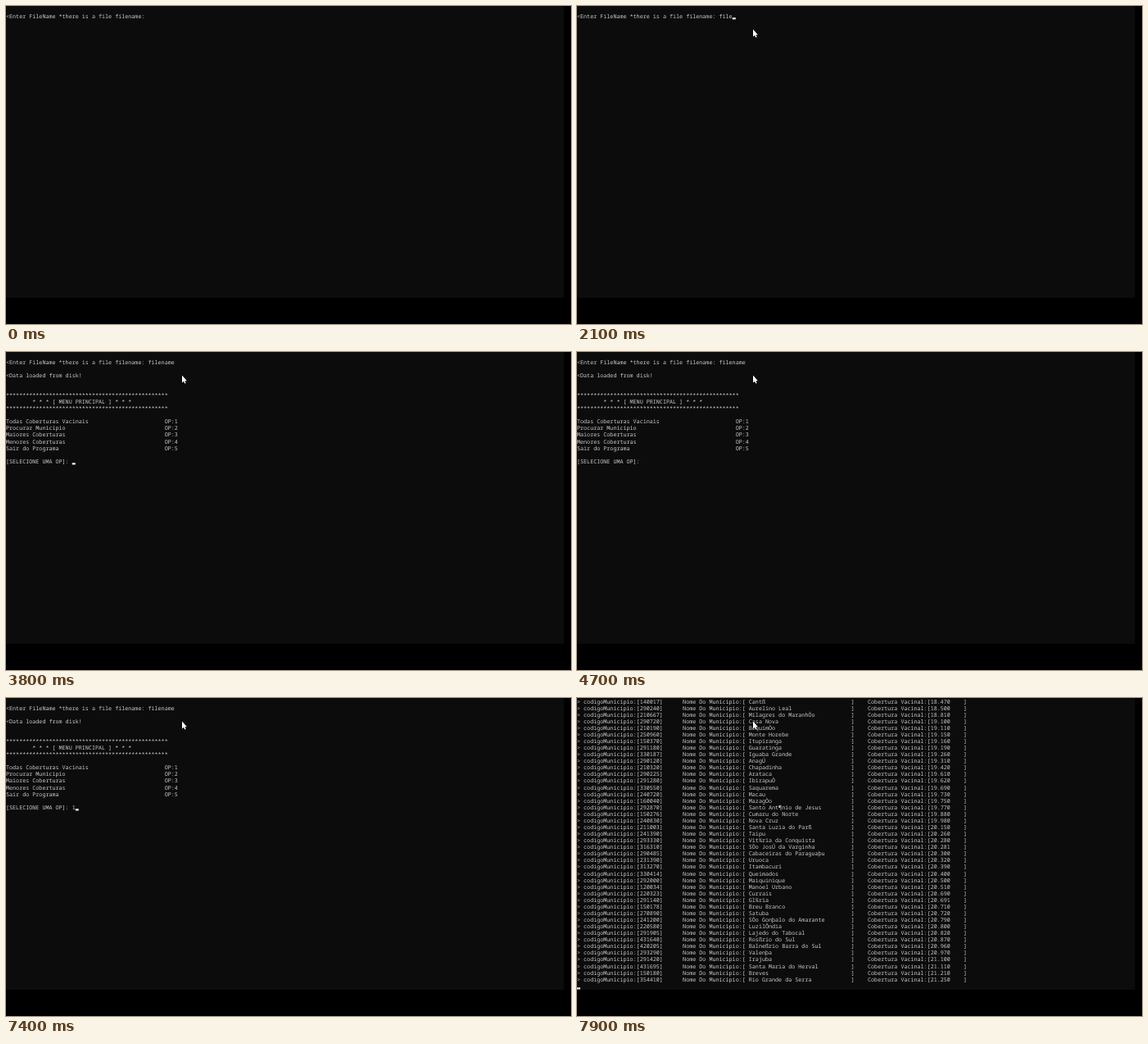
An HTML page with a canvas that plays this animation: 690x388 px, repeating every 8000 ms.

```html
<!DOCTYPE html>
<html lang="pt">
<head>
<meta charset="utf-8">
<title>Console</title>
<style>
  html, body { margin: 0; width: 100%; height: 100%; overflow: hidden; background: #000; }
  canvas { display: block; }
</style>
</head>
<body>
<canvas id="stage" width="690" height="388"></canvas>
<script>
const LOOP = 8000;
const COL = 10, ROW = 20, SCALE = 0.4037; // character cell in console units
const ctx = document.getElementById('stage').getContext('2d');

const prompt = '\n<Enter FileName *there is a file filename: ';
const stars = '*'.repeat(49);
const options = ['Todas Coberturas Vacinais', 'Procurar Municipio', 'Maiores Coberturas',
  'Menores Coberturas', 'Sair do Programa'];
const menu = [
  prompt + 'filename', '', '<Data loaded from disk!', '', '',
  stars, ' '.repeat(8) + '* * * [ MENU PRINCIPAL ] * * *', stars, '',
  ...options.map((label, i) => label.padEnd(48) + 'OP:' + (i + 1)),
  '', '[SELECIONE UMA OP]: '
].join('\n');

// Each line: code, coverage, town
const table = lines => lines.trim().split('\n').map(line => {
  const [code, coverage, ...town] = line.split(' ');
  return `> codigoMunicipio:[${code}]`.padEnd(32) +
    `Nome Do Municipio:[ ${town.join(' ')}`.padEnd(51) + ']    ' +
    `Cobertura Vacinal:[${coverage.padEnd(10)}]\n`;
}).join('');

const firstPage = table(`
330070 10.240 Cabo Frio
291360 10.470 IlhÚus
291500 10.700 ItaetÛ
260345 10.840 Camaragibe
330045 10.870 Belford Roxo
150375 10.920 Jacareacanga
230910 11.250 Mulungu
220385 11.310 Floresta do PiauÝ
431575 11.510 Riozinho
316650 11.620 Serra Azul de Minas
330320 11.800 Nil¾polis
231260 12.190 SÒo LuÝs do Curu
510780 12.270 Santo Ant¶nio do Leverger
230610 12.380 Irauþuba
211010 12.440 Santa QuitÚria do MaranhÒo
291340 12.480 IgaporÒ
500100 12.540 Aparecida do Taboado
351970 12.700 Ibi·na
292467 12.720 PiraÝ do Norte
250400 12.780 Campina Grande
330227 12.840 Japeri
354075 13.180 Potim
292860 13.350 Santo Amaro
150500 13.400 Nova Timboteua
240240 13.600 Carna·ba dos Dantas
240980 13.601 Pedro Velho
510785 13.800 SÒo FÚlix do Araguaia
330555 14.140 SeropÚdica
330520 14.220 SÒo Pedro da Aldeia
431990 14.470 Sapiranga
353910 14.570 Pirapora do Bom Jesus
431700 14.600 Santana da Boa Vista
110143 14.710 Nova UniÒo
354910 14.910 SÒo JoÒo da Boa Vista
220530 14.920 Jerumenha
330490 14.921 SÒo Gonþalo
240170 15.150 Bom Jesus
292730 15.390 Salinas da Margarida
330510 15.410 SÒo JoÒo de Meriti
211140 15.430 SÒo LuÝs Gonzaga do MaranhÒo
290740 15.530 CatolÔndia
210690 15.580 MonþÒo
291540 15.620 Itaju do Col¶nia`);

const secondPage = table(`
140017 18.470 Cantß
290240 18.500 Aurelino Leal
210667 18.810 Milagres do MaranhÒo
290720 19.100 Casa Nova
210190 19.110 BequimÒo
250960 19.150 Monte Horebe
150370 19.160 Itupiranga
291180 19.190 Guaratinga
330187 19.260 Iguaba Grande
290120 19.310 AnagÚ
210320 19.420 Chapadinha
290225 19.610 Arataca
291280 19.620 IbirapuÒ
330550 19.690 Saquarema
240720 19.730 Macau
160040 19.750 MazagÒo
292870 19.770 Santo Ant¶nio de Jesus
150276 19.880 Cumaru do Norte
240830 19.980 Nova Cruz
211003 20.150 Santa Luzia do Parß
241390 20.260 Taipu
293330 20.280 Vit¾ria da Conquista
316310 20.281 SÒo JosÚ da Varginha
290485 20.300 Cabaceiras do Paraguaþu
231390 20.320 Uruoca
313270 20.390 Itambacuri
330414 20.400 Queimados
292000 20.500 Maiquinique
120034 20.510 Manoel Urbano
220323 20.690 Currais
291140 20.691 Gl¾ria
150178 20.710 Breu Branco
270890 20.720 Satuba
241200 20.790 SÒo Gonþalo do Amarante
220580 20.800 LuzilÔndia
291905 20.820 Lajedo do Tabocal
431640 20.870 Rosßrio do Sul
420205 20.960 Balneßrio Barra do Sul
293290 20.970 Valenþa
291420 21.100 Irajuba
431695 21.110 Santa Maria do Herval
150180 21.210 Breves
354410 21.250 Rio Grande da Serra`);

// Start time, console contents, caret visible
const steps = [
  [0, prompt, false], [1500, prompt, true],
  [1800, prompt + 'fi', true], [2000, prompt + 'fil', true], [2100, prompt + 'file', true],
  [2600, prompt + 'filen', true], [2700, prompt + 'filena', true],
  [2800, prompt + 'filenam', true], [2900, prompt + 'filename', true],
  [3100, prompt + 'filename', false], [3700, prompt + 'filename', true],
  [3800, menu, true], [4700, menu, false], [5200, menu, true],
  [5800, menu, false], [6300, menu, true],
  [6500, menu + '1', true], [6800, menu + '1', false], [7400, menu + '1', true],
  [7800, firstPage, true], [7900, secondPage, true]
];

function drawConsole(text, caretOn) {
  const lines = text.split('\n');
  ctx.save();
  ctx.scale(SCALE, SCALE);
  ctx.font = '16.667px "Noto Sans Mono", monospace';
  ctx.textRendering = 'geometricPrecision';
  ctx.fillStyle = '#ccc';
  lines.forEach((line, row) => ctx.fillText(line, 0, row * ROW + 16.3));
  if (caretOn) {
    ctx.fillStyle = '#f2f2f2';
    ctx.fillRect(lines.at(-1).length * COL, lines.length * ROW - 5, COL, 5.5);
  }
  ctx.restore();
}

function drawPointer(x, y) {
  const arrow = new Path2D('M0 0V8.9L2 7.1L3.3 10L4.7 9.4L3.4 6.6H6Z');
  ctx.save();
  ctx.translate(x, y);
  ctx.strokeStyle = '#000';
  ctx.lineWidth = 0.8;
  ctx.stroke(arrow);
  ctx.fillStyle = '#fff';
  ctx.fill(arrow);
  ctx.restore();
}

function draw(time) {
  const [, text, caretOn] = steps.findLast(([start]) => start <= time);
  ctx.fillStyle = '#000';
  ctx.fillRect(0, 0, 690, 388);
  ctx.fillStyle = '#0c0c0c';
  ctx.fillRect(0, 0, 681.5, 356);
  drawConsole(text, caretOn);
  if (time >= 1200) drawPointer(215, 28.6);
  else if (time >= 1100) drawPointer(220, 30.4);
}

function tick(now) {
  draw(now % LOOP);
  requestAnimationFrame(tick);
}
requestAnimationFrame(tick);
</script>
</body>
</html>
```
